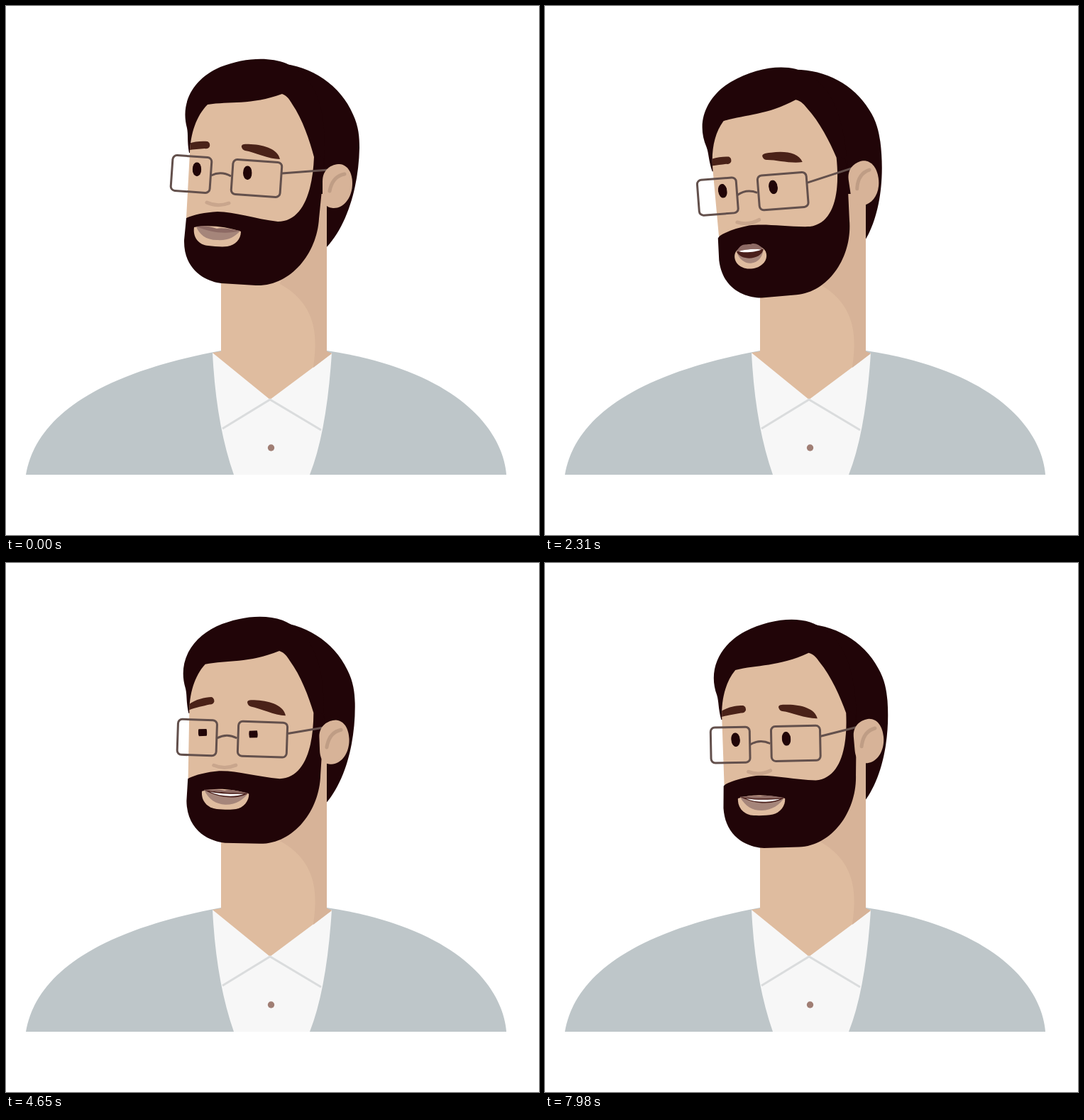
Animation of 751 by 746 pixels, one loop 8 s. Source, as an HTML page without scripts:

```html
<!DOCTYPE html>
<html lang="en">
<head>
<meta charset="utf-8">
<title>Talking man</title>
<style>
/* a: head angle, p: sideways turn of the face, l/r: brow height, lr/rr: brow tilt */
@property --a { syntax: "<number>"; inherits: true; initial-value: 0; }
@property --p { syntax: "<number>"; inherits: true; initial-value: 0; }
@property --l { syntax: "<number>"; inherits: true; initial-value: 0; }
@property --r { syntax: "<number>"; inherits: true; initial-value: 0; }
@property --lr { syntax: "<number>"; inherits: true; initial-value: 0; }
@property --rr { syntax: "<number>"; inherits: true; initial-value: 0; }

html, body { margin: 0; width: 100%; height: 100%; overflow: hidden; background: #fff; }
svg {
  display: block; width: 100%; height: 100%;
  animation: turn 8s ease-in-out infinite, brows 8s ease-in-out infinite;
}

.hair { fill: #210508; }
.skin { fill: #dfbc9f; }
.shade { fill: #d7b398; }
.brow { fill: #4a2218; transform-box: fill-box; transform-origin: center; }
.wire { fill: none; stroke: #63504c; stroke-width: 3; }
.line { fill: none; stroke-linecap: round; stroke-width: 5; }

.head { transform-origin: 426px 371px; transform: rotate(calc(var(--a) * 1deg)); }
.front { transform: translate(calc(var(--p) * .4px), calc(var(--p) * -.1px)); }
.beard { transform: translate(calc(var(--a) * .2px), calc(var(--a) * -.3px)); }
.face { transform: translate(calc(var(--p) * 1px), calc(var(--a) * -.75px + var(--p) * .14px)); }
.arm {
  transform-origin: 390px 236px;
  transform: translate(calc(var(--p) * 1px), calc(var(--a) * -.75px + var(--p) * .14px))
    rotate(calc(var(--a) * .65deg - var(--p) * .13deg));
}
.brow.left {
  transform: translate(calc(var(--p) * .6px), calc(var(--a) * -.75px + var(--l) * 1px)) rotate(calc(var(--lr) * 1deg));
}
.brow.right {
  transform: translate(calc(var(--p) * .7px), calc(var(--a) * -.75px + var(--r) * 1px)) rotate(calc(var(--rr) * 1deg));
}

.eye { fill: #210508; animation: blink 8s linear infinite; }

/* mouth parts: smile, half open, open */
.mouth path { d: var(--smile); animation: talk 8s ease-in-out infinite; }
.patch {
  --smile: path("M265 312C263 327 272 337 285 338C293 339 305 340 312 339C323 337 331 329 331 318C310 311 285 308 265 312Z");
  --half: path("M265 313C263 327 272 337 285 339C293 340 305 341 312 340C323 338 331 329 331 319C310 312 285 308 265 313Z");
  --open: path("M277 316C270 321 270 334 281 341C288 346 302 346 309 341C318 336 320 324 313 318C303 308 288 308 277 316Z");
}
.lower {
  fill: #a5857a;
  --smile: path("M268 311C272 322 282 330 297 330C313 331 322 326 330 317C310 320 290 318 268 311Z");
  --half: path("M268 311C274 325 284 332 297 333C312 334 323 327 330 318C312 317 290 316 268 311Z");
  --open: path("M276 318C278 330 286 337 295 337C304 337 311 331 314 320C300 317 288 316 276 318Z");
}
.inside {
  fill: #4a201c;
  --smile: path("M268 311C290 318 310 320 330 317C310 320 290 318 268 311Z");
  --half: path("M268 311C290 316 312 317 330 318C315 327 288 324 268 311Z");
  --open: path("M276 318C288 316 300 317 314 320C309 334 281 333 276 318Z");
}
.teeth {
  fill: #fff;
  --smile: path("M276 314C290 318 310 320 324 319C310 320 290 318 276 314Z");
  --half: path("M276 314C290 318 312 319 324 319C312 323 290 322 276 314Z");
  --open: path("M279 318C288 316 300 317 311 320C305 322 287 322 279 318Z");
}
.upper {
  fill: #8d6a64;
  --smile: path("M268 311C278 309 288 311 297 314C305 312 318 315 330 317C310 322 290 320 268 311Z");
  --half: path("M268 311C278 311 290 311 297 313C305 311 318 315 330 318C312 317 290 316 268 311Z");
  --open: path("M276 318C282 309 288 308 295 311C302 308 308 311 314 320C300 317 288 316 276 318Z");
}

@keyframes turn {
  0%, 1.125% { --a: 0; --p: 0; }
  5.25% { --a: 1; --p: 2; }
  16.125% { --a: -9.1; --p: -3; }
  21%, 27.5% { --a: -8.6; --p: -1.5; }
  36.375% { --a: -3.5; --p: 11; }
  37.875%, 49.5% { --a: -3.4; --p: 11.5; }
  58.125% { --a: -2.1; --p: 13; }
  59.25% { --a: -2; --p: 12.7; }
  64.375% { --a: -4.9; --p: 9.5; }
  69.375% { --a: -3; --p: 11; }
  74.625%, 100% { --a: -5.1; --p: 11; }
}
@keyframes brows {
  0%, 1.125% { --l: 0; --lr: 0; --r: 0; --rr: 0; }
  10.5% { --l: -9; --lr: 3; --r: -8; --rr: 0; }
  21%, 28.875% { --l: -9; --lr: 6; --r: -9; --rr: -2; }
  36.375%, 49.5% { --l: 5; --lr: 6; --r: -12; --rr: 4; }
  58.125% { --l: -5.5; --lr: -6; --r: -3.5; --rr: 3; }
  74.625%, 81.375% { --l: -5; --lr: 0; --r: -4; --rr: 3; }
  87.75%, 92.625% { --l: -9; --lr: 0; --r: -8; --rr: 3; }
  99.5%, 100% { --l: -5; --lr: 0; --r: -4; --rr: 3; }
}
@keyframes blink {
  0%, 9%, 12%, 19.5%, 21.75%, 41.625%, 45%, 57%, 60.75%, 79.875%, 83.25%, 100% { clip-path: inset(0 0); }
  10.25%, 10.875%, 20.5%, 43.125%, 43.5%, 59.25%, 81.56% { clip-path: inset(50% 0); }
}
@keyframes talk {
  0%, 1.125%, 13.75%, 21%, 26.25%, 36.375%, 49.5%, 66.25%, 97.5% { d: var(--smile); }
  6.25%, 55%, 58.125%, 74.625%, 77.25%, 81.375%, 87.75%, 92.625%, 99.6%, 100% { d: var(--half); }
  3.75%, 10.5%, 16.25%, 28.875%, 33%, 52.5%, 56.5%, 62.5%, 69.375%, 85%, 95% { d: var(--open); }
}
</style>
</head>
<body>
<svg viewBox="0 0 751 746">
  <defs>
    <path id="visage" d="M389 124C397 127 400 133 403 138C418 160 428 190 434 213C432 262 418 304 383 304C350 300 322 290 298 290C280 291 265 294 254 299L259 207C260 180 268 155 284 139C315 134 345 140 389 124Z"/>
    <clipPath id="edge"><use href="#visage"/></clipPath>
  </defs>

  <g class="head">
    <path class="hair" d="M385 81C430 84 472 112 489 153C497 170 498 185 498 200C497 255 480 313 448 344L425 300L380 200Z"/>
  </g>

  <path fill="#bec6c9" d="M28 661C40 590 110 522 303 486H452C640 515 700 600 705 661Z"/>
  <path fill="#f7f7f7" d="M291 489L372 540L459 489Q452 600 428 661H321Q296 590 291 489Z"/>
  <path class="skin" d="M303 340L430 265H452V487L459 490L372 555L291 489L303 487Z"/>
  <path class="shade" d="M425 265H452V487L459 490L433 510C440 465 437 420 386 392Z"/>
  <path fill="none" stroke="#dadcdd" stroke-width="3" d="M305 596L372 555L444 598"/>
  <circle fill="#a07e74" cx="373.5" cy="623" r="4.7"/>

  <g class="head">
    <g class="front">
      <path class="hair" d="M258 207C255 190 257 182 255 172C245 135 265 102 302 86C335 73 370 71 395 81C455 109 450 180 448 240L430 240Z"/>
      <path class="hair beard" d="M254 299L251 330C250 375 285 389 303 391L352 394C400 396 438 350 441 300L447 240L448 215L434 205L300 250Z"/>
      <use class="skin" href="#visage"/>
      <g clip-path="url(#edge)">
        <path class="brow left" d="M249 198C260 191 275 190 284 191Q288 193 287 198Q285 202 280 201C270 202 262 202 249 205Z"/>
        <path class="brow right" d="M332 199C331 195 335 194 345 195C365 196 383 202 386 216C370 216 350 206 337 204Q333 203 332 199Z"/>
      </g>
    </g>

    <g class="face">
      <path class="line" stroke="#c9a68d" d="M283 277Q298 284 314 278"/>
      <g class="mouth">
        <path class="skin patch"/>
        <path class="lower"/>
        <path class="inside"/>
        <path class="teeth"/>
        <path class="upper"/>
      </g>
      <ellipse class="eye" cx="269" cy="230.3" rx="6.3" ry="10"/>
      <ellipse class="eye" cx="340.3" cy="235.3" rx="6.3" ry="10"/>
      <g class="wire">
        <rect x="233.5" y="212" width="55" height="50" rx="6" transform="rotate(4 261 237)"/>
        <rect x="318.5" y="218.5" width="69" height="49" rx="6" transform="rotate(4 353 243)"/>
        <path d="M289 239Q303 232 317 240"/>
      </g>
    </g>
    <path class="wire arm" d="M389 236L455 231"/>

    <path class="shade" d="M446 247C446 230 459 223 470 223C482 224 488 236 488 250C488 270 476 285 462 285C455 285 446 282 446 265Z"/>
    <path class="line" stroke="#bf9d85" d="M477 237Q460 240 456 261"/>
  </g>
</svg>
</body>
</html>
```
